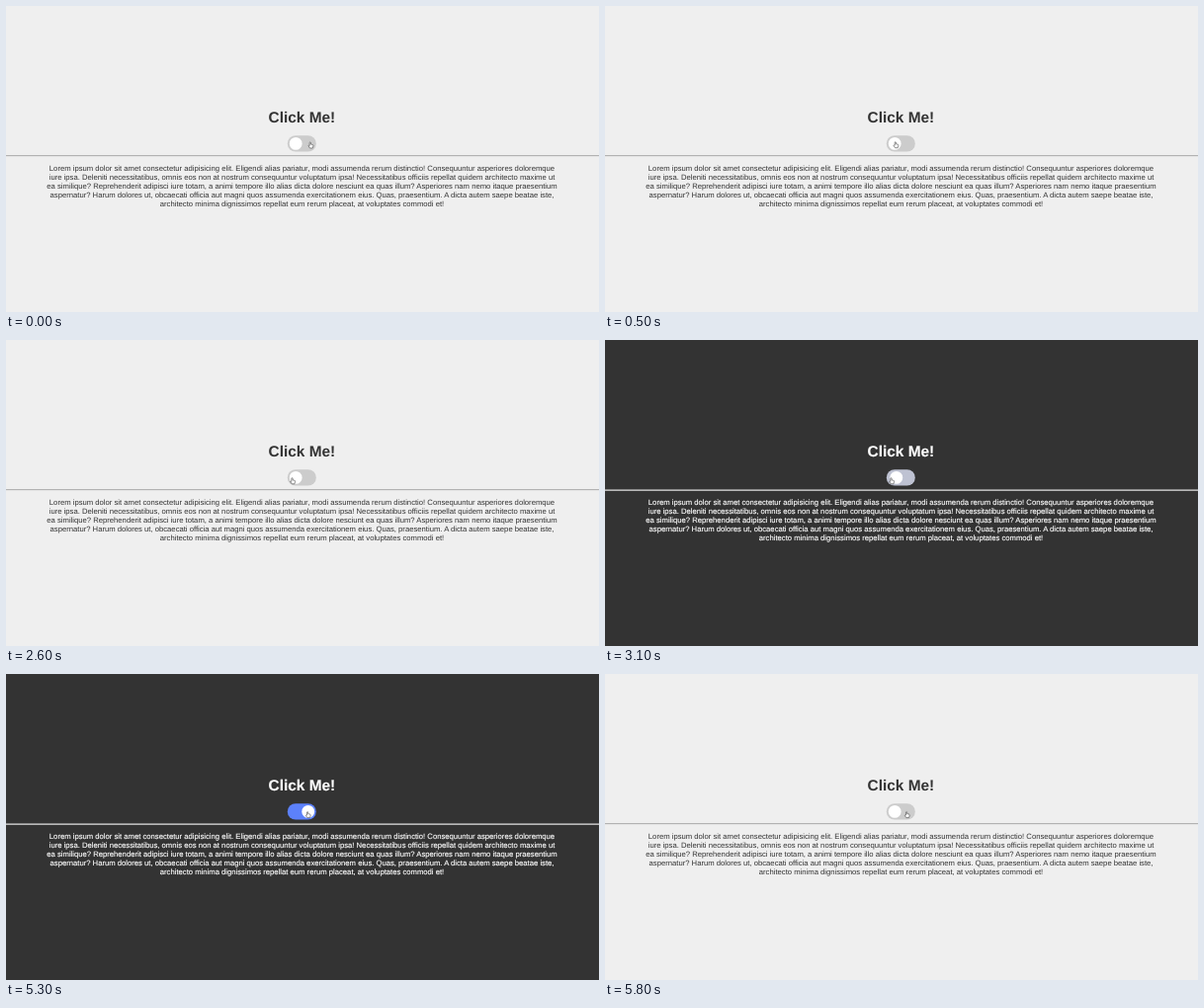
Animation, 600 px wide and 310 px high, one loop 6500 ms. Source, as an HTML page:

```html
<!DOCTYPE html>
<html lang="en">
<head>
<meta charset="utf-8">
<title>Theme toggle</title>
<style>
  html, body { margin: 0; width: 100%; height: 100%; overflow: hidden; background: #efefef; }
  svg {
    --bg: #efefef; --ink: #333; --edge: #b2b2b2; --lip: #e4e4e4; --weight: 0;
    display: block; width: 600px; height: 310px;
  }
  svg.dark { --bg: #333; --ink: #fff; --edge: #8c8c8c; --lip: #b8b8b8; --weight: .14px; }
  .bg { fill: var(--bg); }
  .edge { fill: var(--edge); }
  .lip { fill: var(--lip); }
  text {
    fill: var(--ink);
    stroke: var(--ink);
    stroke-width: var(--weight);
    font-family: Arial, "Liberation Sans", sans-serif;
    text-anchor: middle;
    text-rendering: geometricPrecision;
  }
  .title { font-size: 15.4px; font-weight: bold; }
  .copy { font-size: 7.68px; }
  .hand { fill: #fff; stroke: #444; stroke-width: .6; stroke-linejoin: round; }
</style>
</head>
<body>
<svg id="stage" viewBox="0 0 600 310">
  <rect class="bg" width="600" height="310"/>
  <text class="title" x="299.4" y="118.3">Click Me!</text>
  <rect id="track" x="284.8" y="131.2" width="29" height="16.4" rx="8.2"/>
  <circle id="knob" cy="139.4" r="6.4" fill="#fff"/>
  <rect class="edge" y="151" width="600" height="1"/>
  <rect class="lip" y="152" width="600" height="1"/>
  <g id="copy" class="copy">
    <text>Lorem ipsum dolor sit amet consectetur adipisicing elit. Eligendi alias pariatur, modi assumenda rerum distinctio! Consequuntur asperiores doloremque</text>
    <text>iure ipsa. Deleniti necessitatibus, omnis eos non at nostrum consequuntur voluptatum ipsa! Necessitatibus officiis repellat quidem architecto maxime ut</text>
    <text>ea similique? Reprehenderit adipisci iure totam, a animi tempore illo alias dicta dolore nesciunt ea quas illum? Asperiores nam nemo itaque praesentium</text>
    <text>aspernatur? Harum dolores ut, obcaecati officia aut magni quos assumenda exercitationem eius. Quas, praesentium. A dicta autem saepe beatae iste,</text>
    <text>architecto minima dignissimos repellat eum rerum placeat, at voluptates commodi et!</text>
  </g>
  <path id="hand" class="hand" d="M-1.3-2.7Q-.7-3.5-.1-2.7V-.9L1.8-.5Q2.5-.3 2.4.6L1.7 3H-1L-2.5.7Q-2.3-.1-1.3.5Z"/>
</svg>
<script>
  const LOOP = 6500, TICK = 100;
  const DARK_FROM = 3100, DARK_TO = 5500;
  const GREY = [204, 204, 204], BLUE = [92, 129, 251];

  const HOME = { x: 308.5, y: 141 };
  const MOVES = [
    { at: 0, ms: 500, x: 294.5, y: 140.7 },
    { at: 2000, ms: 600, x: 290.2, y: 142.8 },
    { at: 3800, ms: 600, x: 311, y: 144.6 },
    { at: 4500, ms: 200, x: 305.8, y: 142.6 }
  ];

  const $ = id => document.getElementById(id);
  const [stage, track, knob, hand, copy] = ["stage", "track", "knob", "hand", "copy"].map($);
  const mix = (a, b, p) => a + (b - a) * p;
  const clamp = v => Math.min(1, Math.max(0, v));
  const smooth = p => p * p * (3 - 2 * p);
  const easeOut = p => 1 - (1 - p) ** 2;
  const progress = (t, at, ms) => clamp((t - at) / ms);

  [...copy.children].forEach((line, i) => {
    line.setAttribute("x", 299.5);
    line.setAttribute("y", 166.9 + 8.95 * i);
  });

  function handAt(t) {
    return MOVES.reduce((pos, move) => {
      const p = smooth(progress(t, move.at, move.ms));
      return { x: mix(pos.x, move.x, p), y: mix(pos.y, move.y, p) };
    }, HOME);
  }

  function draw(now) {
    const t = Math.floor((now % LOOP) / TICK) * TICK;
    const on = smooth(progress(t, DARK_FROM - 90, 400)) - easeOut(progress(t, DARK_TO, 300));
    const { x, y } = handAt(t);
    stage.classList.toggle("dark", t >= DARK_FROM && t < DARK_TO);
    track.setAttribute("fill", `rgb(${GREY.map((c, i) => Math.round(mix(c, BLUE[i], on)))})`);
    knob.setAttribute("cx", mix(293.2, 305.7, on));
    hand.setAttribute("transform", `translate(${x} ${y})`);
  }

  const start = performance.now();
  function loop() {
    draw(performance.now() - start);
    requestAnimationFrame(loop);
  }
  loop();
</script>
</body>
</html>
```
